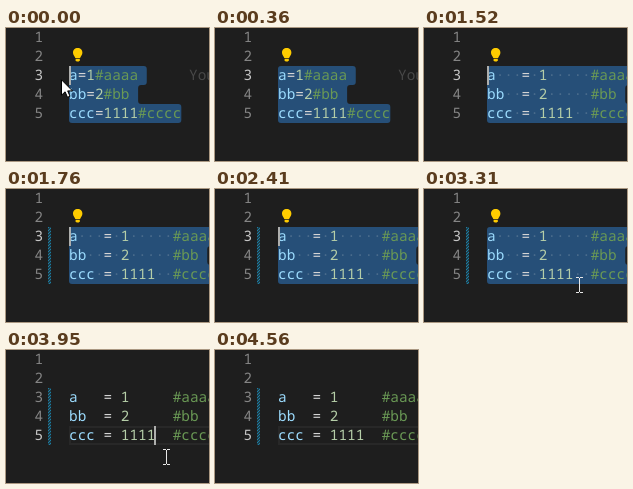
These frames come from a looping animation (203x133 px, 4.58 s). An HTML page:

```html
<!DOCTYPE html>
<html lang="en">
<head>
<meta charset="utf-8">
<title>Aligning assignments in an editor</title>
<style>
  html, body { margin: 0; width: 100%; height: 100%; overflow: hidden; background: #1e1e1e; }
  svg { display: block; width: 203px; height: 133px; }
  text {
    font: 14.4px "Noto Sans Mono", "DejaVu Sans Mono", monospace;
    font-variant-ligatures: none;
    text-rendering: geometricPrecision;
    white-space: pre;
  }
  .num { fill: #858585; }
  .num.on { fill: #c6c6c6; }
  .name { fill: #9cdcfe; }
  .op { fill: #d4d4d4; }
  .value { fill: #b5cea8; }
  .note { fill: #6a9955; }
  .dot { fill: #e3e4e2; fill-opacity: .2; }
  .blame { fill: #999; fill-opacity: .35; }
</style>
</head>
<body>
<svg id="stage" viewBox="0 0 203 133" xmlns="http://www.w3.org/2000/svg">
  <defs>
    <pattern id="hatch" width="3" height="3" patternUnits="userSpaceOnUse">
      <path d="M-1 1L1 -1M-1 4L4 -1M2 4L4 2" stroke="#1b81a8" stroke-width="1.2"/>
    </pattern>
  </defs>
  <rect width="203" height="133" fill="#1e1e1e"/>
  <rect id="active" x="64" y="77" width="160" height="17" fill="none" stroke="#282828" stroke-width="2"/>
  <g id="nums"></g>
  <rect id="changed" x="42" y="38" width="3" height="57" fill="url(#hatch)"/>
  <g id="tight"></g>
  <g id="aligned"></g>
  <g id="bulb" fill="#ffcc00">
    <path d="M71.7 20C68.9 20 67 22.1 67 24.7C67 27 68.7 28 69.3 30H74.1C74.7 28 76.4 27 76.4 24.7C76.4 22.1 74.5 20 71.7 20Z"/>
    <path d="M69.6 30.8H73.8V32.2L72.8 33.4H70.6L69.6 32.2Z"/>
  </g>
  <rect id="caret" width="2" height="19" fill="#aeafad"/>
  <path id="arrow" d="M.5 .8V16.2L4.1 12.8L6.5 18.3L9 17.2L6.7 11.9H11.5Z" fill="#fff" stroke="#000" stroke-width="1"/>
  <path id="beam" d="M0 .5H3M4 .5H7M3.5 1V15M0 15.5H3M4 15.5H7" fill="none" stroke="#e8e8e8"/>
</svg>
<script>
const LOOP = 4580, LEFT = 63, COL = 8.64, ROW = 19, BASE = 14;
const $ = id => document.getElementById(id);
const colX = c => LEFT + c * COL;

function add(parent, tag, attrs, content = '') {
  const el = document.createElementNS('http://www.w3.org/2000/svg', tag);
  for (const key in attrs) el.setAttribute(key, attrs[key]);
  el.textContent = content;
  parent.append(el);
  return el;
}

// Closed path through the points, every corner rounded
function rounded(points, radius) {
  const toward = (a, b) => {
    const k = radius / Math.hypot(b[0] - a[0], b[1] - a[1]);
    return [a[0] + (b[0] - a[0]) * k, a[1] + (b[1] - a[1]) * k];
  };
  const n = points.length;
  return points.map((p, i) => {
    const from = toward(p, points[(i + n - 1) % n]);
    const to = toward(p, points[(i + 1) % n]);
    return `${i ? 'L' : 'M'}${from}Q${p} ${to}`;
  }).join('') + 'Z';
}

function selection(group, lines) {
  const last = lines.length - 1;
  const edge = lines.flatMap((line, i) => {
    const x = colX(line.length + (i < last ? 1 : 0));
    return [[x, (i + 2) * ROW], [x, (i + 3) * ROW]];
  });
  const points = [[LEFT, 2 * ROW], ...edge, [LEFT, (last + 3) * ROW]];
  return add(group, 'path', { d: rounded(points, 3), fill: '#264f78' });
}

function code(group, lines) {
  const marks = [selection(group, lines)];
  lines.forEach((line, i) => {
    const y = (i + 2) * ROW + BASE;
    for (const m of line.matchAll(/#\w+|[a-z]+|\d+|=| /g)) {
      const t = m[0], x = colX(m.index);
      const kind = t[0] === '#' ? 'note' : t === '=' ? 'op' : t === ' ' ? 'dot'
        : /\d/.test(t) ? 'value' : 'name';
      const el = add(group, 'text', { x, y, class: kind }, t === ' ' ? '·' : t);
      if (kind === 'dot') marks.push(el);
    }
  });
  return marks;
}

const nums = [1, 2, 3, 4, 5].map(n =>
  add($('nums'), 'text', { x: 28.5, y: (n - 1) * ROW + BASE, class: 'num' }, n));

code($('tight'), ['a=1#aaaa', 'bb=2#bb', 'ccc=1111#cccc']);
add($('tight'), 'text', { x: 183, y: 2 * ROW + BASE, class: 'blame' }, 'You');
const marks = code($('aligned'),
  ['a   = 1     #aaaa', 'bb  = 2     #bb', 'ccc = 1111  #cccc']);

// Each step changes only the listed parts
const steps = [
  [0, { tight: true, selected: true, line: 3, bulb: true, caret: true, stripe: 0, arrow: [55, 51], beam: null }],
  [120, { caret: false, arrow: [56, 52] }],
  [240, { arrow: [57, 53] }],
  [360, { arrow: null }],
  [610, { caret: true }],
  [1110, { caret: false }],
  [1520, { tight: false, caret: true }],
  [1640, { stripe: .5 }],
  [1760, { stripe: 1 }],
  [2040, { caret: false }],
  [2410, { caret: true }],
  [2910, { caret: false }],
  [3170, { beam: [160, 103] }],
  [3310, { beam: [152, 88] }],
  [3430, { selected: false, line: 5, caret: true }],
  [3710, { bulb: false, beam: [153, 91] }],
  [3830, { beam: [155, 95] }],
  [3950, { beam: [157, 99] }],
  [4200, { caret: false, beam: [158, 102] }],
  [4320, { beam: [160, 105] }],
  [4440, { beam: [162, 109] }],
  [4560, { beam: null }]
];

const show = (el, on) => { el.style.visibility = on ? 'visible' : 'hidden'; };

function place(id, at) {
  show($(id), at);
  if (at) $(id).setAttribute('transform', `translate(${at})`);
}

function draw(time) {
  const s = {};
  for (const [start, change] of steps) if (start <= time) Object.assign(s, change);
  $('tight').style.display = s.tight ? '' : 'none';
  $('aligned').style.display = s.tight ? 'none' : '';
  marks.forEach(el => show(el, s.selected));
  show($('active'), !s.selected);
  show($('bulb'), s.bulb);
  show($('caret'), s.caret);
  $('caret').setAttribute('x', s.line === 3 ? LEFT : 148);
  $('caret').setAttribute('y', (s.line - 1) * ROW);
  $('changed').style.opacity = s.stripe;
  nums.forEach((el, i) => el.classList.toggle('on', i + 1 === s.line));
  place('arrow', s.arrow);
  place('beam', s.beam);
}

const begin = performance.now();
function tick() {
  draw((performance.now() - begin) % LOOP);
  requestAnimationFrame(tick);
}
tick();
</script>
</body>
</html>
```
